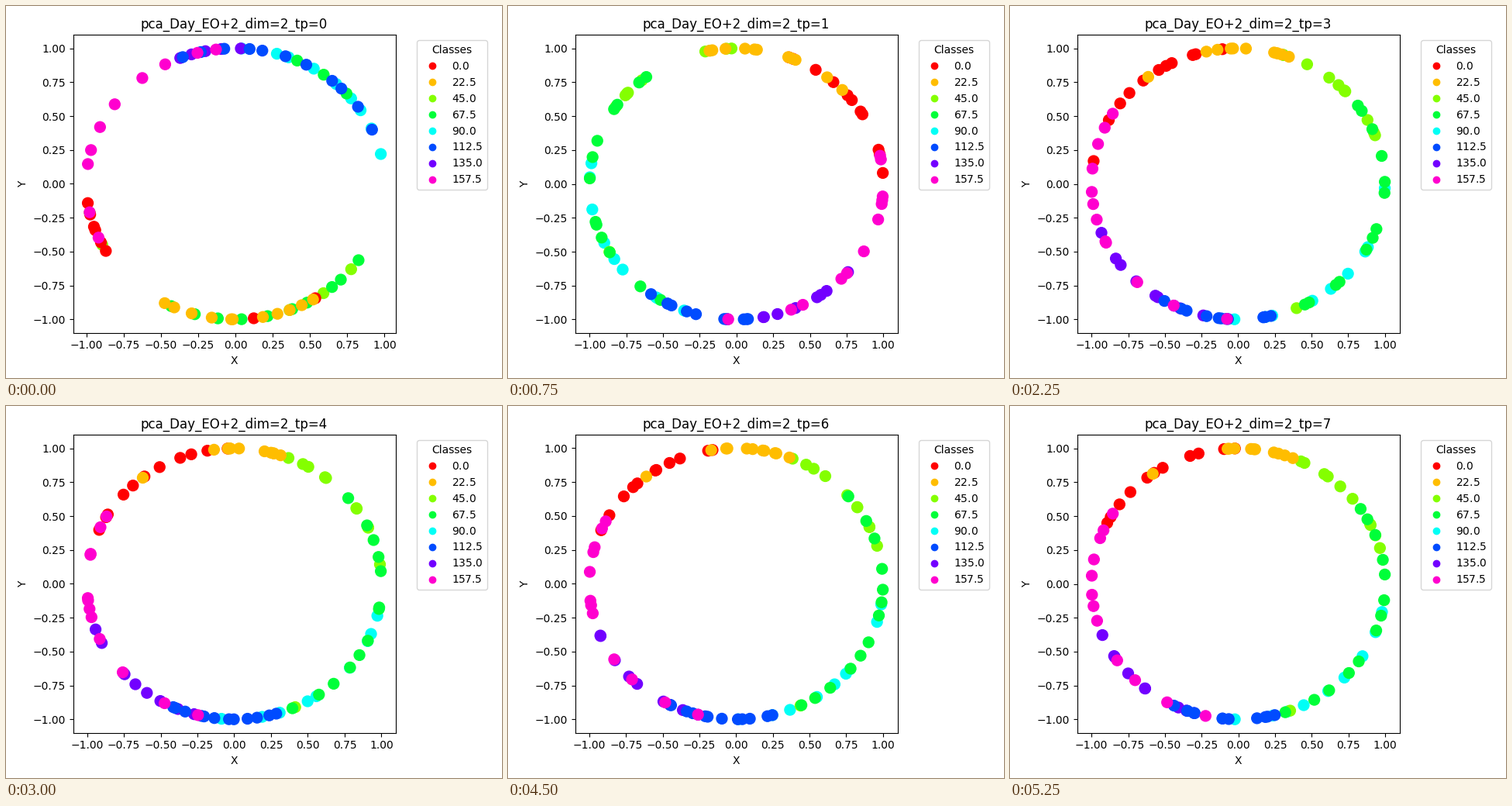
Animation of 640x480 px, one loop 6000 ms. Source, as a matplotlib script:

```python
import numpy as np
import matplotlib.pyplot as plt
from matplotlib.animation import FuncAnimation

STEPS = 8
R, O, L, G, C, B, P, M = CLASSES = np.arange(8) * 22.5

# Runs of dots in drawing order: class, first angle, last angle, count.
START = [
    (L, -168, -153, 2), (L, -70, -38, 3), (C, 12, 88, 9), (G, -113, -35, 10),
    (G, 40, 67, 3), (R, -170, -150, 6), (R, -84, -58, 2), (O, -119, -58, 11),
    (P, 85, 111, 5), (B, 26, 113, 11), (M, 94, 176, 8), (M, -168, -158, 2),
]
SETTLED = [
    (C, -12, -90, 9), (R, 155, 95, 11), (L, 70, 15, 10), (L, -65, -65, 1),
    (O, 127, 127, 1), (O, 97, 68, 10), (P, -104, -160, 9), (G, 37, -68, 13),
    (B, -74, -118, 12), (M, -102, -150, 4), (M, -163, -210, 8),
]


def layout(step):
    """Class and position of every dot at one time point."""
    runs = SETTLED if step else START
    angles = np.concatenate([np.linspace(a, b, n) for _, a, b, n in runs])
    kinds = np.repeat([run[0] for run in runs], [run[3] for run in runs])
    noise = 2 + 6 / step if step else 2
    angles += np.random.default_rng(step).normal(0, noise, len(angles))
    if step:
        angles += 54 / 3**step  # the turn fades as the ring settles
    if step in (1, 2):
        angles = 180 - angles
    angles = np.radians(angles)
    return kinds, np.column_stack([np.cos(angles), np.sin(angles)])


def limits(values):
    low, high = values.min(), values.max()
    pad = 0.05 * (high - low)
    return low - pad, high + pad


fig, ax = plt.subplots(figsize=(6.4, 4.8), dpi=100)
kinds, xy = layout(0)
dots = ax.scatter(*xy.T, c=kinds, s=100, cmap="hsv", vmin=0, vmax=180)
ax.set_xlabel("X")
ax.set_ylabel("Y")
ax.legend(*dots.legend_elements(), title="Classes",
          bbox_to_anchor=(1.05, 1), loc="upper left")


def update(step):
    kinds, xy = layout(step)
    dots.set_offsets(xy)
    dots.set_array(kinds)
    ax.set_xlim(limits(xy[:, 0]))
    ax.set_ylim(limits(xy[:, 1]))
    ax.set_title(f"pca_Day_EO+2_dim=2_tp={step}")
    return (dots,)


update(0)
fig.tight_layout()
anim = FuncAnimation(fig, update, frames=STEPS, interval=750,
                     repeat=True, repeat_delay=0)
plt.show()
```
